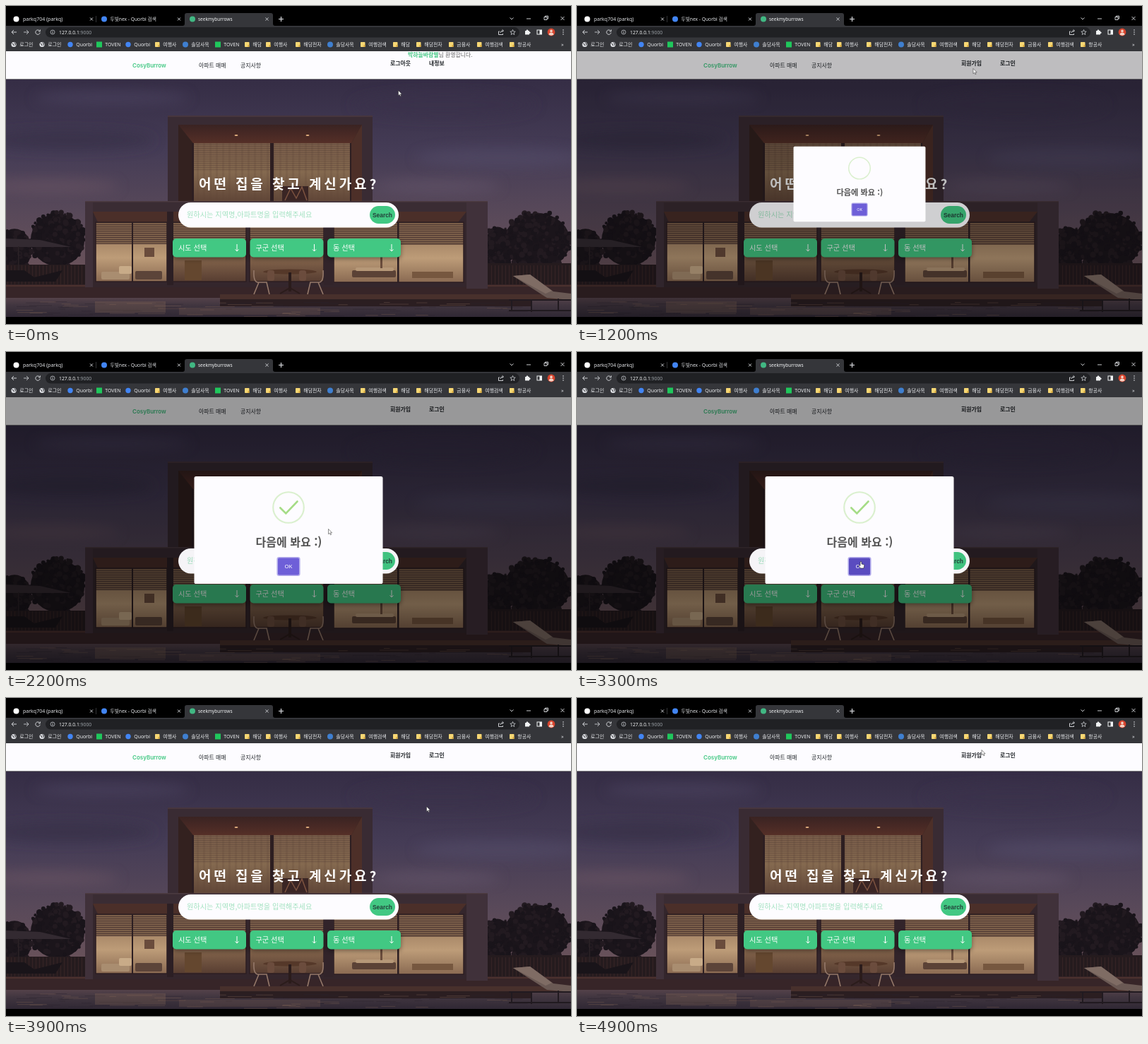
Write an HTML page that moves like this. It is 800 by 450 pixels and loops after 5 s.

```html
<!DOCTYPE html>
<html lang="ko">
<head>
<meta charset="utf-8">
<style>
html, body { margin: 0; width: 100%; height: 100%; overflow: hidden; background: #000; }
svg { display: block; width: 100vw; height: 100vh; }
text { font-family: 'Noto Sans', 'Noto Sans CJK KR', 'Noto Sans CJK', sans-serif; white-space: pre; }
.kr { font-family: 'Noto Sans CJK KR', 'Noto Sans CJK', sans-serif; }
.ico { fill: none; stroke: #dfe1e5; stroke-width: .9; }
</style>
</head>
<body>
<svg id="stage" viewBox="0 0 800 450"></svg>
<script>
const GREEN = '#42c883';
let seed = 7;
const rnd = () => (seed = seed * 16807 % 2147483647) / 2147483647;
const rect = (x, y, w, h, fill, more = '') => `<rect x="${x}" y="${y}" width="${w}" height="${h}" fill="${fill}" ${more}/>`;
const poly = (points, fill, more = '') => `<polygon points="${points}" fill="${fill}" ${more}/>`;
const disc = (x, y, r, fill, more = '') => `<circle cx="${x}" cy="${y}" r="${r}" fill="${fill}" ${more}/>`;
const oval = (x, y, rx, ry, fill, more = '') => `<ellipse cx="${x}" cy="${y}" rx="${rx}" ry="${ry}" fill="${fill}" ${more}/>`;
const path = (d, more = 'class="ico"') => `<path d="${d}" ${more}/>`;
// cy is the optical middle of the line
const text = (x, cy, size, str, fill, more = '') =>
  `<text x="${x}" y="${cy + size * .36}" font-size="${size}" fill="${fill}" ${more}>${str}</text>`;
const grad = (id, stops, dir = 'x2="0" y2="1"') => `<linearGradient id="${id}" ${dir}>` +
  stops.map(([o, c]) => `<stop offset="${o}" stop-color="${c}"/>`).join('') + '</linearGradient>';
const KR = 'class="kr"', BOLD = 'class="kr" font-weight="700"', MID = 'class="kr" font-weight="500"';

const defs = `<defs>
  ${grad('sky', [[0, '#352d45'], [.3, '#453c56'], [.55, '#574859'], [.8, '#69525a']])}
  ${grad('ceil', [[0, '#3a2322'], [1, '#552f27']])}
  ${grad('bright', [[0, '#8c6c52'], [.6, '#bd9c78'], [1, '#8a6a52']])}
  ${grad('dusky', [[0, '#6f5341'], [.6, '#84654c'], [1, '#573d31']])}
  ${grad('curtain', [[0, '#795d49'], [.5, '#84694f'], [1, '#5f4537']])}
  ${grad('water', [[0, '#54424a'], [.4, '#40353f'], [1, '#302834']])}
  ${grad('line', [[0, '#3fb56a'], [.5, '#9ad07e'], [1, '#7fd6d0']], 'x2="1" y2="0"')}
  <pattern id="slats" width="4" height="3" patternUnits="userSpaceOnUse">${rect(0, 0, 4, 1.2, '#3e2a2b')}</pattern>
  <pattern id="folds" width="9" height="4" patternUnits="userSpaceOnUse">${rect(0, 0, 3, 4, '#604536')}</pattern>
  <filter id="soft" x="-30%" y="-60%" width="160%" height="220%"><feGaussianBlur stdDeviation="9"/></filter>
  <filter id="shade" x="-10%" y="-30%" width="120%" height="180%"><feGaussianBlur stdDeviation="3"/></filter>
  <clipPath id="page">${rect(0, 64, 800, 376, '#000')}</clipPath>
</defs>`;

function browser() {
  const icons = {
    globe: x => disc(x, 54.5, 3.6, '#dfe1e5') + path(`M${x - 2.5} 53l2 1 0 2M${x + .5} 52l2 1-1 3`, 'fill="none" stroke="#35363a" stroke-width="1"'),
    blue: x => disc(x, 54.5, 3.7, '#4285f4'),
    sea: x => disc(x, 54.5, 4, '#3f7fd0'),
    green: x => rect(x - 4, 50.5, 8, 8, '#1fc75c'),
    folder: x => rect(x - 3, 51, 6.5, 7, '#f7d774', 'rx=".7"') + rect(x + 1.5, 55, 2, 3, '#d9a93c')
  };
  const marks = [
    [11, 'globe', '로그인'], [51, 'globe', '로그인'], [91, 'blue', 'Quorbi'], [132, 'green', 'TOVEN'],
    [173, 'blue', 'Quorbi'], [214, 'folder', '여행사'], [254, 'sea', '솔담사옥'], [300, 'green', 'TOVEN'],
    [341, 'folder', '해담'], [371, 'folder', '여행사'], [413, 'folder', '해담전자'], [459, 'sea', '솔담사옥'],
    [505, 'folder', '여행검색'], [551, 'folder', '해담'], [584, 'folder', '해담전자'], [630, 'folder', '금융사'],
    [670, 'folder', '여행검색'], [716, 'folder', '항공사']
  ];
  const cross = (x, y, r) => path(`M${x - r} ${y - r}l${2 * r} ${2 * r}m0 ${-2 * r}l${-2 * r} ${2 * r}`);
  return rect(0, 0, 800, 64, '#000') +
    path('M250 28q3 0 3-3V13q0-3 3-3H375q3 0 3 3V25q0 3 3 3z', 'fill="#35363a"') +
    rect(0, 28, 800, 36, '#35363a') + rect(56, 30, 671, 14.6, '#202124', 'rx="7.3"') +
    disc(14.5, 18.5, 4, '#fff') + disc(139, 18.5, 4, '#4285f4') + disc(264, 18.5, 4, '#41b883') +
    text(24, 18.5, 7, 'parkq704 (parkq)', '#e3e5e8') +
    text(147.5, 18.5, 6.7, '두빛nex - Quorbi 검색', '#e3e5e8') +
    text(272, 18.5, 6.5, 'seekmyburrows', '#f1f3f4') +
    [121, 245, 369.5].map(x => cross(x, 18.5, 2)).join('') + rect(127, 14, .6, 9, '#55575b') +
    path('M386 18.5h7m-3.5-3.5v7', 'class="ico" style="stroke-width:1.2"') +
    path('M713.5 16.5l2.5 2.5 2.5-2.5M737 18h6M762 15.5h4v4h-4zM763.5 15.3v-1.2h4v4h-1.2') + cross(788, 17.5, 2.5) +
    path('M15 37H8m3-3l-3 3 3 3') + `<g opacity=".85">${path('M25 37h7m-3-3l3 3-3 3')}</g>` +
    path('M47.6 35.2a3.2 3.2 0 1 0 .6 2.4M48.4 33.4v2.4h-2.4') +
    disc(66, 37, 3, 'none', 'stroke="#bdc1c6" stroke-width=".8"') + path('M66 36.5v2.2M66 35v.7') +
    text(75, 37.2, 6.8, '127.0.0.1<tspan fill="#9aa0a6">:9000</tspan>', '#f1f3f4') +
    path('M699 36h-1.5v4.5h6V39M700 38q0-3 4-3m-1.5-1.7l2 1.7-2 1.7') +
    path('M717.5 33.5l1 2.5 2.7.2-2.1 1.7.7 2.6-2.3-1.4-2.3 1.4.7-2.6-2.1-1.7 2.7-.2z', 'class="ico" style="stroke-width:.7"') +
    rect(735, 35, 6, 5.5, '#f1f3f4', 'rx=".6"') + disc(738, 34.7, 1.3, '#f1f3f4') + disc(741.3, 37.7, 1.3, '#f1f3f4') +
    rect(752, 34, 6.5, 6, 'none', 'stroke="#f1f3f4"') + rect(755.5, 34, 3, 6, '#f1f3f4') +
    disc(772, 37, 5.4, '#d8442d') + disc(772, 35.4, 1.8, '#f3d3c6') + path('M768.5 40.5q.5-3 3.5-3t3.5 3q-3.5 2.3-7 0z', 'fill="#f3d3c6"') +
    [34, 37, 40].map(y => disc(789, y, .8, '#dfe1e5')).join('') +
    marks.map(([x, kind, label]) => icons[kind](x) + text(x + 8.3, 54.5, 6.9, label, '#eceef0')).join('') +
    text(786, 54, 7, '»', '#dfe1e5');
}

// dense crown: a solid core with ragged leaves around it
function tree(cx, cy, rx, ry, n) {
  let out = oval(cx, cy, rx * .93, ry * .93, '#1b151b');
  for (let i = 0; i < n; i++) {
    const a = rnd() * 6.283, d = Math.sqrt(rnd());
    out += disc((cx + Math.cos(a) * rx * d).toFixed(1), (cy + Math.sin(a) * ry * d).toFixed(1), (1.5 + rnd() * 3).toFixed(1), rnd() < .6 ? '#19141a' : '#221a20');
  }
  return out;
}

function pane(x, y, w, h, blind, room) {
  return rect(x, y, w, h, `url(#${room})`) + rect(x, y, w, blind, '#80634c') + rect(x, y, w, blind, 'url(#slats)', 'opacity=".75"') +
    rect(x, y, w, h, 'none', 'stroke="#2c1e22" stroke-width="1.5"');
}

function photo() {
  let s = rect(0, 104, 800, 336, 'url(#sky)');
  const clouds = [[90, 190, 120, 14, '#352e45'], [60, 255, 100, 10, '#6a5464'], [620, 140, 130, 18, '#3a334b'],
    [700, 215, 120, 14, '#524c68'], [610, 255, 90, 10, '#63546a'], [150, 130, 110, 10, '#4d4562']];
  for (const [x, y, rx, ry, c] of clouds) s += oval(x, y, rx, ry, c, 'opacity=".6" filter="url(#soft)"');
  s += tree(73, 331, 41, 40, 150) + tree(12, 345, 26, 32, 70) + tree(752, 333, 50, 43, 190) + tree(696, 344, 20, 34, 70);
  // fence and terrace
  s += rect(0, 366, 115, 36, '#251b1e') + rect(680, 364, 120, 38, '#251b1e');
  for (let x = 2; x < 800; x += 5) if (x < 112 || x > 682) s += rect(x, 367, 1, 33, '#362425');
  s += rect(0, 394, 800, 22, '#372528') + rect(0, 395, 800, 2, '#4b312e');
  // upper storey
  s += rect(229, 155, 290, 130, '#392b33') + rect(229, 155, 290, 2, '#47363d') +
    rect(244, 168, 260, 110, '#33211f') + poly('244,168 504,168 489,194 265,194', 'url(#ceil)') +
    poly('504,168 504,278 489,278 489,194', '#4d2f28') +
    rect(265, 194, 224, 83, 'url(#curtain)') + rect(265, 194, 224, 83, 'url(#folds)', 'opacity=".2"') +
    rect(265, 194, 224, 40, 'url(#slats)', 'opacity=".25"') +
    rect(374, 194, 5, 83, '#2d1e21') + rect(263, 194, 3, 83, '#2d1e21') + rect(487, 194, 2, 83, '#2d1e21') +
    rect(391, 255, 37, 22, '#3a2524') + path('M395 275l8-17 8 14 8-16 7 19', 'stroke="#7d5340" fill="none" stroke-width="1.5"') +
    [326, 427].map(x => oval(x, 183, 2.5, 1, '#e7b483')).join('');
  // lower storey
  s += rect(112, 276, 570, 122, '#34262c') + rect(112, 276, 570, 15, '#3a2c33') + rect(112, 276, 570, 1.5, '#4c3b41') +
    poly('123,291 652,291 640,306 130,306', '#4b2f29') + rect(652, 278, 30, 122, '#40313a') + rect(112, 278, 11, 120, '#40313a') +
    pane(127, 306, 101, 84, 31, 'bright') + pane(236, 306, 104, 84, 26, 'dusky') +
    pane(345, 306, 105, 84, 26, 'dusky') + pane(464, 306, 184, 85, 32, 'bright') +
    rect(178, 306, 2, 84, '#2c1e22') + rect(554, 306, 2.5, 85, '#2c1e22') + rect(228, 291, 9, 104, '#2c1f24') + rect(450, 291, 14, 104, '#32242a');
  // furniture
  s += rect(135, 376, 40, 11, '#a98d70', 'rx="2"') + rect(160, 368, 18, 11, '#c8ab88', 'rx="2"') + rect(183, 375, 38, 12, '#5c4439', 'rx="2"') +
    rect(196, 342, 14, 13, '#6a4c3c') + rect(253, 360, 24, 28, '#64472f') +
    rect(490, 374, 62, 10, '#5b4236', 'rx="2"') + rect(495, 370, 54, 5, '#b69878', 'rx="2"') + rect(575, 376, 58, 9, '#76573f') +
    rect(530, 349, 3, 22, '#6b4d3c');
  s += oval(402, 376, 38, 3.5, '#553829') + rect(400, 377, 4, 27, '#2b1c1b') + path('M388 407l14-8 14 8', 'fill="none" stroke="#2b1c1b" stroke-width="2"') +
    [[358, 1], [442, -1]].map(([x, k]) => path(`M${x - 7 * k} 374q${-k} 17 ${6 * k} 17h${12 * k}l${4 * k} 17m${-15 * k} -17l${-7 * k} 17`, 'fill="none" stroke="#95796a" stroke-width="1.6"')).join('') +
    [375, 420].map(x => rect(x - 5, 374, 10, 15, '#6b4c3d', 'rx="3"')).join('');
  s += poly('0,329 48,331 92,341 0,341', '#332a31') + rect(17, 340, 1.5, 54, '#2b2226') +
    path('M0 374l26 0 14 10 40-10-10 16H0z', 'fill="#191419"');
  // pool
  s += rect(0, 413, 800, 27, 'url(#water)') + rect(303, 408, 497, 7, '#48302c') + rect(303, 415, 440, 10, '#2b1e21');
  for (let i = 0; i < 90; i++) s += rect((rnd() * 720).toFixed(1), (418 + rnd() * 21).toFixed(1), (8 + rnd() * 34).toFixed(1), .8, rnd() < .4 ? '#7a5e52' : '#2a232d', 'opacity=".5"');
  s += rect(126, 418, 100, 16, '#9b765d', 'opacity=".22"') + rect(245, 427, 200, 10, '#9b765d', 'opacity=".18"');
  // lounger
  s += poly('718,382 742,380 775,404 800,407 800,416 766,413', '#6a5954') + poly('718,382 742,380 773,403 764,407', '#7f6c64') +
    path('M712 416h88M712 431h88M716 416v15M744 416v17M782 414v18', 'stroke="#211a20" fill="none" stroke-width="2"');
  return s;
}

const nav = rect(0, 64, 800, 39.5, '#fdfcff') +
  text(179, 84, 8, 'CosyBurrow', GREEN, `font-weight="600" style="font-family:Inter,sans-serif"`) +
  text(273, 84, 7.9, '아파트 매매', '#212529', MID) + text(332, 84, 7.9, '공지사항', '#212529', MID) +
  `<g id="member">${text(569, 69, 7.9, `<tspan font-weight="700" fill="${GREEN}">박하늘바람별</tspan>님 환영합니다.`, '#666', KR)}
    ${text(544, 81.5, 7.9, '로그아웃', '#212529', BOLD + ' id="logout"')}${text(599, 81.5, 7.9, '내정보', '#212529', BOLD)}
    ${rect(539, 100, 36, 1.6, 'url(#line)', 'id="under"')}</g>` +
  `<g id="guest">${text(544, 81.5, 7.9, '회원가입', '#212529', BOLD)}${text(599, 81.5, 7.9, '로그인', '#212529', BOLD)}</g>`;

const select = (x, label) => rect(x, 332, 104, 26, '#000', 'rx="5" opacity=".4" filter="url(#shade)"') +
  rect(x, 329, 104, 26.5, GREEN, 'rx="5"') + text(x + 8, 342, 10.2, label, '#fff', KR) +
  path(`M${x + 91} 337v10m-2.5-2.6l2.5 2.6 2.5-2.6`, 'fill="none" stroke="#fff" stroke-width="1"');

const bar = rect(244, 278, 312, 35.5, '#fdfcff', 'rx="17.7"') +
  text(256, 295, 10.2, '원하시는 지역명,아파트명을 입력해주세요', '#a3e2c1', MID) +
  rect(515, 283, 36, 25, GREEN, 'rx="12.5"') +
  text(533, 295.5, 8.4, 'Search', '#23413a', `font-weight="700" text-anchor="middle" style="font-family:'Liberation Sans',sans-serif"`);

const dialog = rect(266.5, 176, 267, 152, '#fdfcff', 'rx="2.6"') +
  disc(400, 220, 21.8, 'none', 'stroke="#a5dc86" stroke-opacity=".4" stroke-width="2.1"') +
  path('M388.3 220.5l8 8L412.5 211.5', 'id="tick" fill="none" stroke="#a5dc86" stroke-width="2.6" stroke-linecap="round" pathLength="1" stroke-dasharray="1 2"') +
  text(400.5, 269.5, 16, '다음에 봐요 :)', '#545454', `${BOLD} text-anchor="middle"`) +
  rect(384.2, 290.7, 31.6, 25.6, '#6e5fd8', 'id="ok" rx="2.5" stroke="#b5aeec" stroke-width="1.6"') +
  text(400, 303.5, 7.8, 'OK', '#fff', 'text-anchor="middle"');

const cursors = `<g id="arrow">${path('M0 0V7.2L1.7 5.7 2.9 8.3 4 7.8 2.9 5.3H5.1z', 'fill="#fff" stroke="#222" stroke-width=".5"')}</g>
  <g id="hand">${path('M-1 .5Q0-.6 1 .5V3.5L4 4.2Q5 4.5 4.8 5.6L4 9.5H-.8L-3.2 5.6Q-2.8 4.4-1 6z', 'fill="#fff" stroke="#222" stroke-width=".6"')}</g>`;

document.getElementById('stage').innerHTML = defs + `<g clip-path="url(#page)">${photo()}${nav}
  ${text(273, 252.5, 19, '어떤 집을 찾고 계신가요?', '#fff', BOLD + ' letter-spacing="3.9"')}
  ${select(236, '시도 선택')}${select(345.5, '구군 선택')}${select(455, '동 선택')}
  ${rect(0, 64, 800, 376, '#000', 'id="dim"')}<g id="bar">${bar}</g><g id="dialog">${dialog}</g></g>` + browser() + cursors;

const el = id => document.getElementById(id);
const show = (id, on) => el(id).style.display = on ? '' : 'none';
const set = (id, key, value) => el(id).setAttribute(key, value);
const ease = p => (p = Math.max(0, Math.min(1, p))) * p * (3 - 2 * p);

// value at t from [time, ...values] stops
function along(stops, t) {
  const i = Math.max(1, stops.findIndex(s => s[0] > t)), a = stops[i - 1], b = stops[i];
  const p = ease((t - a[0]) / (b[0] - a[0]));
  return a.slice(1).map((v, k) => v + (b[k + 1] - v) * p);
}

const route = [[0, 555.5, 119.5], [600, 563.5, 88.5], [800, 563.5, 88.5], [1200, 561, 88.5], [1400, 561, 88.5],
  [2200, 456.5, 250.5], [3000, 402, 296.5], [3500, 402, 296.5], [3900, 595.5, 153.5], [4900, 573, 73.5], [5000, 555.5, 119.5]];
const zoom = [[0, .7], [1200, .7], [1335, 1.05], [1440, .95], [1500, 1], [3500, 1], [3650, .5], [5000, .5]];
const shade = [[0, 0], [1140, 0], [1200, .25], [1300, .4], [3500, .4], [3650, 0], [5000, 0]];
const light = [[0, 1], [1100, 1], [1200, .82], [1300, .84], [1800, .97], [3500, .97], [3650, 1], [5000, 1]];

function draw(now) {
  const t = Math.floor(now % 5000 / 100) * 100;
  const [x, y] = along(route, t), [k] = along(zoom, t);
  const overLink = t >= 500 && t < 1200, overOk = t >= 2900 && t <= 3500;
  show('member', t < 1200);
  show('guest', t >= 1200);
  set('logout', 'fill', overLink ? '#1c55c0' : '#212529');
  set('under', 'width', overLink ? 36 * ease((t - 400) / 300) : 0);
  set('dim', 'opacity', along(shade, t)[0]);
  el('bar').style.filter = `brightness(${along(light, t)[0]})`;
  show('dialog', t >= 1200 && t < 3650);
  set('dialog', 'transform', `translate(400 252) scale(${k}) translate(-400 -252)`);
  set('dialog', 'opacity', 1 - ease((t - 3500) / 150));
  set('tick', 'stroke-dashoffset', 1 - ease((t - 1550) / 400));
  show('tick', t > 1550);
  set('ok', 'fill', overOk ? '#5a4cc0' : '#6e5fd8');
  const hand = overLink || overOk;
  show('hand', hand);
  show('arrow', !hand);
  set(hand ? 'hand' : 'arrow', 'transform', `translate(${x} ${y})`);
}

const start = performance.now();
(function loop() {
  draw(performance.now() - start);
  requestAnimationFrame(loop);
})();
</script>
</body>
</html>
```
